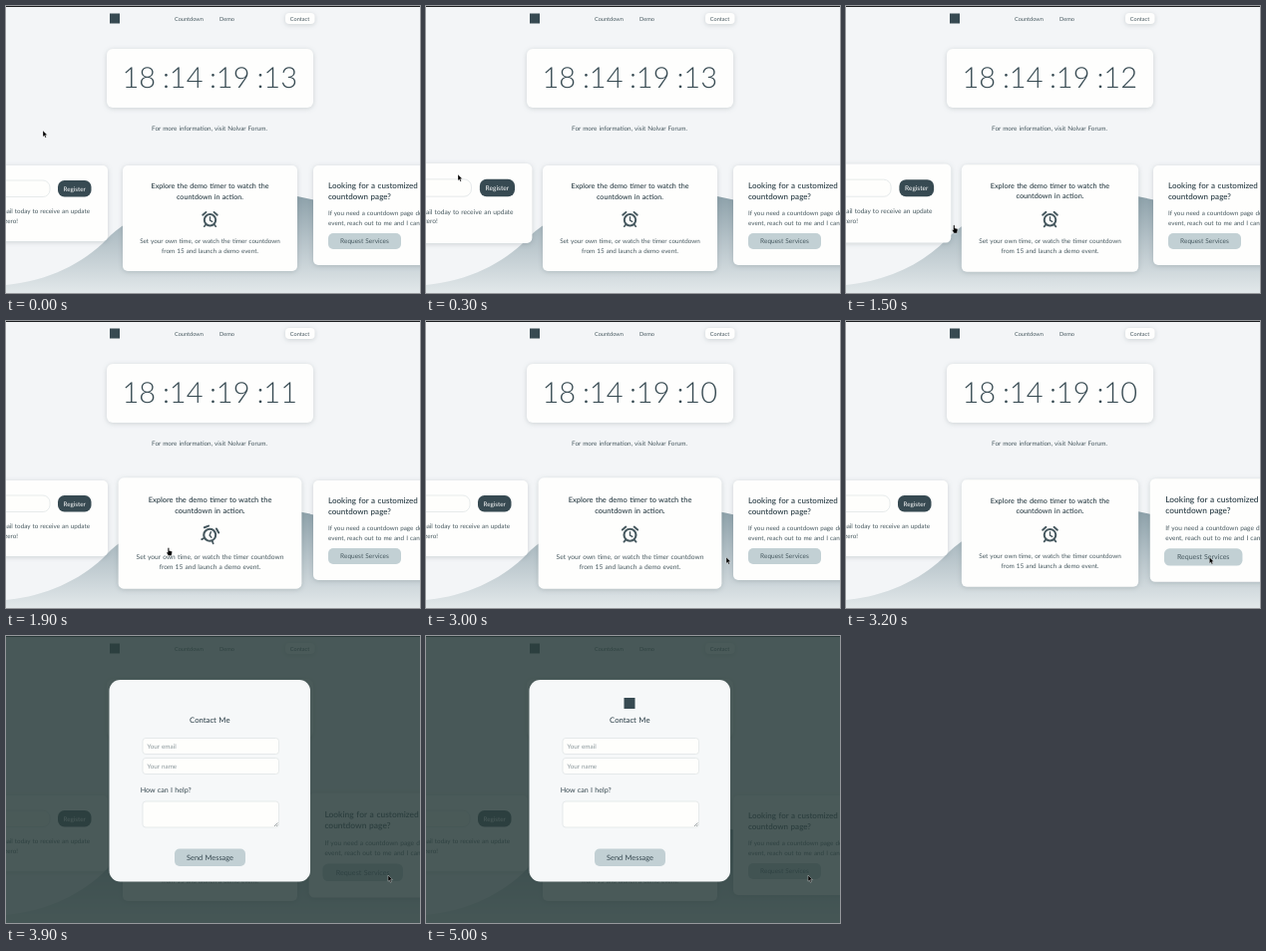
Animation, 415 px wide and 288 px high, one loop 5100 ms. Source, as an HTML page:

```html
<!DOCTYPE html>
<html lang="en">
<head>
<meta charset="utf-8">
<title>Countdown</title>
<style>
html, body { margin: 0; width: 100%; height: 100%; overflow: hidden; background: #f3f5f7; }
svg { display: block; width: 100vw; height: 100vh; }
text { font: 6.3px Lato, "Open Sans", sans-serif; word-spacing: .07em; fill: #46585f; text-rendering: geometricPrecision; }
.mid { text-anchor: middle; }
.end { text-anchor: end; }
.nav { font-size: 5.6px; }
.label { font-size: 7.1px; fill: #35474f; }
.head { font-weight: 600; }
.large { font-size: 8px; }
.panel { fill: #fefefd; filter: drop-shadow(0 1.5px 2.5px rgba(55, 74, 82, .2)); }
.field { fill: #fefefc; stroke: #dde2e4; stroke-width: .7; }
.soft { fill: #c2d0d4; }
.dark { fill: #374a52; }
.hint { fill: #8b979c; }
.line { fill: none; stroke: #46585f; stroke-linecap: round; }
#timer text { font-size: 29px; font-weight: 300; fill: #374a52; }
</style>
</head>
<body>
<svg viewBox="0 0 415 288" preserveAspectRatio="none">
  <defs>
    <linearGradient id="fade" gradientUnits="userSpaceOnUse" x1="0" y1="184" x2="0" y2="288">
      <stop offset="0" stop-color="#879ca5"/>
      <stop offset=".5" stop-color="#b6c3c9"/>
      <stop offset="1" stop-color="#e2e8ea"/>
    </linearGradient>
  </defs>

  <rect width="415" height="288" fill="#f3f5f7"/>
  <path d="M0 280C42 276 78 258 101 234C128 206 200 170 292 191C340 200 380 215 415 222V288H0Z" fill="url(#fade)"/>
  <rect width="415" height="1" fill="#1c1e20"/>

  <rect class="dark" x="104" y="7.5" width="10" height="10"/>
  <text class="nav" x="169" y="14.5">Countdown</text>
  <text class="nav" x="214" y="14.5">Demo</text>
  <rect class="panel" x="280" y="7" width="29.5" height="11" rx="4"/>
  <text class="nav mid" x="294.5" y="14.5">Contact</text>

  <rect class="panel" x="101" y="43" width="207" height="59" rx="6"/>
  <g id="timer">
    <text x="116.5" y="82">18</text>
    <text class="end" x="197.5" y="82">:14</text>
    <text class="end" x="244.5" y="82">:19</text>
    <text class="end" x="292" y="82" id="seconds">:13</text>
  </g>
  <text class="mid" x="204" y="125">For more information, visit Nolvar Forum.</text>

  <g id="signup">
    <rect class="panel" x="-73" y="160" width="175" height="76" rx="5"/>
    <rect class="field" x="-57" y="175" width="101" height="16.5" rx="7"/>
    <rect class="dark" x="52" y="175" width="33.5" height="16.5" rx="6.5"/>
    <text class="mid" x="68.7" y="185.5" style="fill:#fff">Register</text>
    <text class="end" x="84" y="208">Enter your email today to receive an update</text>
    <text class="end" x="12" y="217.5">when it hits zero!</text>
  </g>

  <g id="demo">
    <rect class="panel" x="117" y="160" width="175" height="106" rx="5"/>
    <text class="mid label head" x="204.5" y="183">Explore the demo timer to watch the</text>
    <text class="mid label head" x="204.5" y="193.5">countdown in action.</text>
    <g id="clock">
      <circle class="line" cy=".7" r="5.7" stroke-width="2"/>
      <path class="line" stroke-width="1.9" d="M-7.3-4.3-4-7.1M7.3-4.3 4-7.1"/>
      <path class="line" stroke-width="1.7" d="M-4.3 5.5-5.8 7.2M4.3 5.5 5.8 7.2"/>
      <path class="line" stroke-width="1.4" d="M0-2.3V1L2.2 2.3"/>
    </g>
    <text class="mid" x="204.5" y="238">Set your own time, or watch the timer countdown</text>
    <text class="mid" x="204.5" y="247.5">from 15 and launch a demo event.</text>
  </g>

  <g id="custom">
    <rect class="panel" x="308" y="160" width="175" height="100" rx="5"/>
    <text class="label head large" x="323" y="183">Looking for a customized</text>
    <text class="label head large" x="323" y="193.5">countdown page?</text>
    <text x="323" y="210">If you need a countdown page designed for your</text>
    <text x="323" y="219.5">event, reach out to me and I can make it.</text>
    <g id="request">
      <rect class="soft" x="323" y="228" width="73" height="16" rx="5"/>
      <text class="mid" x="359.5" y="238.3" style="font-size:6.5px">Request Services</text>
    </g>
  </g>

  <g id="modal">
    <rect width="415" height="288" fill="#2b3e3d" fill-opacity=".85"/>
    <rect x="103.5" y="44" width="201.5" height="202.5" rx="11" fill="#f6f8f9"/>
    <rect id="mark" class="dark" x="198.5" y="62" width="11" height="11"/>
    <text class="mid label" x="204.3" y="86.5" style="font-size:7.7px;font-weight:500">Contact Me</text>
    <rect class="field" x="137" y="102.5" width="136.5" height="16" rx="3"/>
    <text class="hint" x="141.5" y="112.7">Your email</text>
    <rect class="field" x="137" y="122.5" width="136.5" height="16" rx="3"/>
    <text class="hint" x="141.5" y="132.7">Your name</text>
    <text class="label" x="134.8" y="156.5">How can I help?</text>
    <rect class="field" x="137" y="166" width="136.5" height="26" rx="3"/>
    <path d="M269 191L272.5 187.5M271 191L272.5 189.5" stroke="#59666b" stroke-width=".6"/>
    <rect class="soft" x="169" y="213.5" width="71" height="17.5" rx="5"/>
    <text class="mid label" x="204.5" y="225" style="font-size:7.4px">Send Message</text>
  </g>

  <g id="cursor" stroke="#fff" stroke-width=".35">
    <path id="arrow" d="M0 0V6.2L1.4 5 2.4 7.3 3.4 6.8 2.5 4.6H4.4Z"/>
    <path id="hand" d="M1.2.6a.7.7 0 0 1 1.4 0V3L5 3.6Q5.7 4 5.4 5.2L4.8 8H1.8L0 5.2Q.2 4.2 1.2 4.8Z"/>
  </g>
</svg>

<script>
const LOOP = 5100, TICK = 100;
const el = id => document.getElementById(id);

const progress = (t, start, length) => Math.min(1, Math.max(0, (t - start) / length));
const ease = p => p * p * (3 - 2 * p);
const between = (t, start, end) => t >= start && t < end;

// Parts that grow around a center while the pointer is over them.
const hovers = [
  { id: "signup", center: [14.5, 198], enter: 0, leave: 1400, fade: 300 },
  { id: "demo", center: [204.5, 213], enter: 1400, leave: 3000, fade: 300 },
  { id: "custom", center: [395.5, 210], enter: 3000, leave: 4900, fade: 100 },
  { id: "request", center: [359.5, 236], enter: 3000, leave: 4900, fade: 100 }
];

// Pointer strokes: start and end time, then the point reached.
const strokes = [
  { start: 0, end: 300, to: [32, 169] },
  { start: 1000, end: 1100, to: [71, 215] },
  { start: 1200, end: 1900, to: [161, 227.5] },
  { start: 2900, end: 3000, to: [301, 237] },
  { start: 3000, end: 3300, to: [386.5, 237] },
  { start: 3800, end: 3900, to: [383, 240] }
];

function pointer(t) {
  return strokes.reduce((from, { start, end, to }) => {
    const p = ease(progress(t, start, end - start));
    return from.map((v, i) => v + (to[i] - v) * p);
  }, [37, 125]);
}

function clockAngle(t) {
  const p = progress(t, 1500, 800);
  return 28 * Math.sin(p * Math.PI * 5) * Math.sqrt(1 - p);
}

function grow({ id, center: [x, y], enter, leave, fade }, t) {
  const amount = ease(progress(t, enter, 300)) - ease(progress(t, leave, fade));
  el(id).setAttribute("transform", `translate(${x} ${y}) scale(${1 + .05 * amount}) translate(${-x} ${-y})`);
}

const show = (id, on) => { el(id).style.display = on ? "" : "none"; };

function render(time) {
  const t = Math.floor(time % LOOP / TICK) * TICK;
  const left = 13 - Math.floor((t + 440) / 1035);
  const pointing = between(t, 1500, 3000) || between(t, 3300, 3900);

  el("seconds").textContent = ":" + String(left).padStart(2, "0");
  hovers.forEach(hover => grow(hover, t));
  el("clock").setAttribute("transform", `translate(204.5 214) rotate(${clockAngle(t)})`);
  show("modal", t >= 3900);
  show("mark", t >= 4000);
  show("hand", pointing);
  show("arrow", !pointing);
  el("cursor").setAttribute("transform", `translate(${pointer(t)})`);
}

let origin;
function frame(now) {
  origin ??= now;
  render(now - origin);
  requestAnimationFrame(frame);
}
render(0);
requestAnimationFrame(frame);
</script>
</body>
</html>
```
